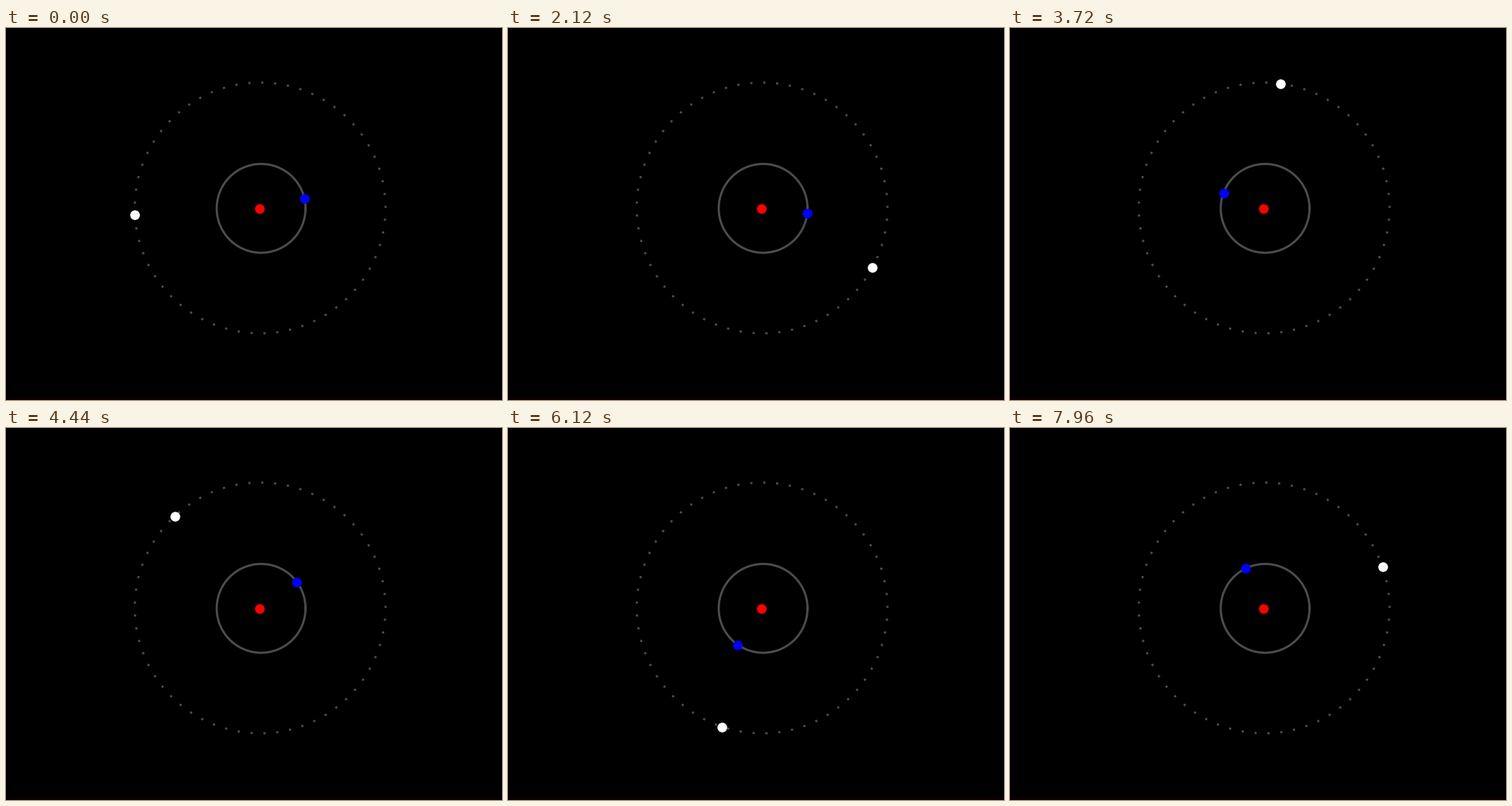
Write a matplotlib script that moves like this. It is 640 px wide and 480 px high and loops after 8000 ms.

```python
import numpy as np
import matplotlib.pyplot as plt
from matplotlib.animation import FuncAnimation
from matplotlib.patches import Rectangle

W, H, DPI = 640, 480, 100
FRAMES, STEP = 200, 40
GREY = "0.3"


class Orbit:
    """Slightly eccentric orbit, fastest on its left side."""

    def __init__(self, cx, cy, radius, ecc, phase, rate):
        self.cx, self.cy, self.radius = cx, cy, radius
        self.ecc, self.phase, self.rate = ecc, phase, rate

    def point(self, angle):
        return (self.cx + self.radius * np.cos(angle),
                self.cy - self.radius * np.sin(angle))

    def at(self, ms):
        mean = self.phase + self.rate * ms
        angle = mean
        for _ in range(8):
            angle = mean - self.ecc * np.sin(angle)
        return self.point(angle)


inner = Orbit(329.2, 232.7, 57.3, 0.058, 0.234, 0.005758)
outer = Orbit(327.9, 232.2, 161.8, 0.0105, 3.195, 0.00122)

fig = plt.figure(figsize=(W / DPI, H / DPI), dpi=DPI, facecolor="black")
ax = fig.add_axes([0, 0, 1, 1])
ax.set_xlim(0, W)
ax.set_ylim(H, 0)
ax.axis("off")

# faint strip along the bottom edge
ax.add_patch(Rectangle((0, H - 4), W, 4, color="#0a0000", lw=0))

turn = np.linspace(0, 2 * np.pi, 721)
ax.plot(*inner.point(turn), color=GREY, lw=2)
ax.plot(*outer.point(turn), color=GREY, lw=2, ls=(0, (1, 5)))


def body(color, x, y):
    return ax.plot([x], [y], "o", color=color, ms=8)[0]


sun = body("red", 326.5, 232.5)
bodies = [(body("blue", *inner.at(0)), inner),
          (body("white", *outer.at(0)), outer)]


def draw(i):
    for dot, orbit in bodies:
        x, y = orbit.at(i * STEP)
        dot.set_data([x], [y])
    return [dot for dot, _ in bodies]


anim = FuncAnimation(fig, draw, frames=FRAMES, interval=STEP,
                     repeat=True, repeat_delay=0, blit=False)
plt.show()
```
